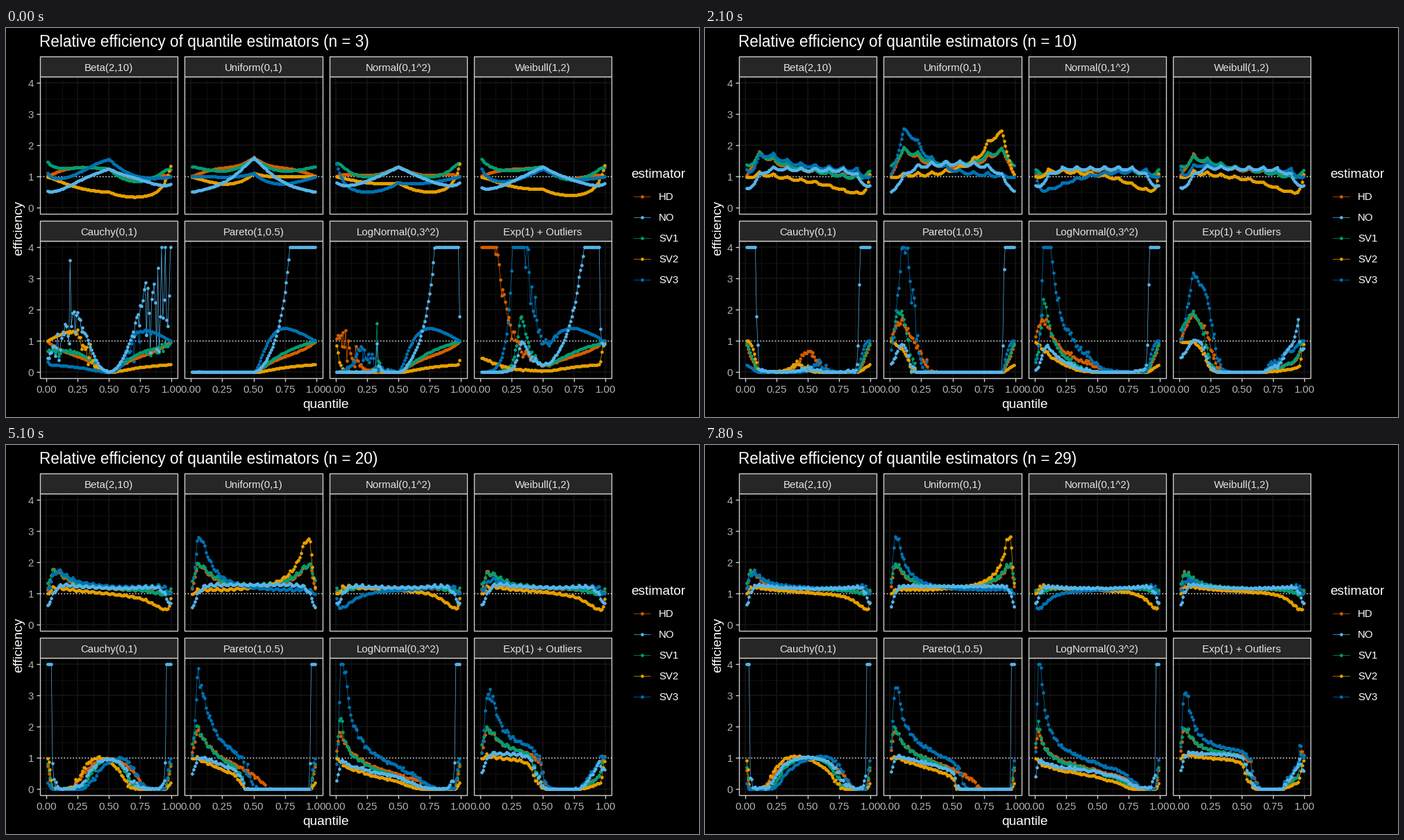
These frames come from a looping animation (998x561 px, 8000 ms). A matplotlib script:

```python
import math

import matplotlib.pyplot as plt
import numpy as np
from matplotlib.animation import FuncAnimation
from matplotlib.collections import LineCollection
from matplotlib.patches import Rectangle

W, H, DPI = 998, 561, 64
PX = 72 / DPI                      # one pixel in points
plt.rcParams["font.family"] = "Liberation Sans"

SIZES = range(3, 30)
P = np.arange(1, 100) / 100
GROUPS, GROUP_SIZE, PICKS = 70, 500, 15
CAP = 4

COLORS = {"HD": "#D55E00", "NO": "#56B4E9", "SV1": "#009E73",
          "SV2": "#E69F00", "SV3": "#0072B2"}
DRAW_ORDER = ["HD", "SV1", "SV2", "SV3", "NO"]

# --- quantile functions of the eight distributions ---
Z = np.linspace(-6, 6, 6001)
PHI = np.array([0.5 * math.erfc(-z / math.sqrt(2)) for z in Z])
BX = np.linspace(0, 1, 4001)
BETA_CDF = 1 - (1 - BX) ** 10 * (1 + 10 * BX)
BODY_SHARE, MAX_OUTLIER = 0.95, 4000


def normal(u):
    return np.interp(u, PHI, Z)


def exp_outliers(u):
    """Exponential body; the top share is uniform up to MAX_OUTLIER."""
    body = -np.log1p(-np.minimum(u / BODY_SHARE, 0.9999))
    outlier = MAX_OUTLIER * (u - BODY_SHARE) / (1 - BODY_SHARE)
    return np.maximum(body, outlier)


# name, quantile function, heavy tailed
DISTRIBUTIONS = [
    ("Beta(2,10)", lambda u: np.interp(u, BETA_CDF, BX), False),
    ("Uniform(0,1)", lambda u: u, False),
    ("Normal(0,1^2)", normal, False),
    ("Weibull(1,2)", lambda u: np.sqrt(-np.log1p(-u)), False),
    ("Cauchy(0,1)", lambda u: np.tan(np.pi * (u - 0.5)), True),
    ("Pareto(1,0.5)", lambda u: (1 - u) ** -2, True),
    ("LogNormal(0,3^2)", lambda u: np.exp(3 * normal(u)), True),
    ("Exp(1) + Outliers", exp_outliers, True),
]


# --- weights of the order statistics, each of shape (99, n) ---
def hd_weights(n):
    nodes, gauss = np.polynomial.legendre.leggauss(16)
    x = (np.arange(1, n)[:, None] + (nodes + 1) / 2) / n
    half = []
    for p in P[:50]:
        a, b = (n + 1) * p, (n + 1) * (1 - p)
        log_beta = math.lgamma(a) + math.lgamma(b) - math.lgamma(a + b)
        pdf = np.exp((a - 1) * np.log(x) + (b - 1) * np.log1p(-x) - log_beta)
        cells = pdf @ gauss / (2 * n)
        half.append([1 - cells.sum(), *cells])
    half = np.array(half)
    return np.vstack([half, half[-2::-1, ::-1]])


def estimator_weights(n):
    """Reference (linear interpolation) first, then DRAW_ORDER."""
    p = P[:, None]
    ref = np.clip(1 - abs((n - 1) * p - np.arange(n)), 0, 1)
    binom = np.array([math.comb(n, i) * P ** i * (1 - P) ** (n - i)
                      for i in range(n + 1)]).T
    low, high = binom[:, :-1], binom[:, 1:]
    b0, bn = binom[:, :1], binom[:, -1:]

    sv1 = (low + high) / 2
    sv1[:, :3] += b0 / 2 * [1, 1, -1]
    sv1[:, -3:] += bn / 2 * [-1, 1, 1]

    sv2 = low.copy()
    sv2[:, -2:] += bn * [-1, 2]

    sv3 = high.copy()
    sv3[:, :2] += b0 * [2, -1]

    no = (1 - p) * low + p * high
    no[:, :3] += b0 * np.hstack([3 * p - 1, 2 - 3 * p, p - 1])
    no[:, -3:] += bn * np.hstack([-p, 3 * p - 1, 2 - 3 * p])
    return np.array([ref, hd_weights(n), sv1, sv2, sv3, no])


def efficiencies(n):
    """Relative efficiency, shape (distribution, estimator, quantile)."""
    rng = np.random.default_rng(100 + n)
    u = np.sort(rng.random((GROUPS, GROUP_SIZE, n)), axis=-1)
    weights = estimator_weights(n).reshape(-1, n)
    result = []
    for _, quantile, heavy in DISTRIBUTIONS:
        x = quantile(u)
        q = np.tile(quantile(P), 6)
        second = x.transpose(0, 2, 1) @ x / GROUP_SIZE
        square = ((weights @ second) * weights).sum(-1)
        mse = square - 2 * q * (x.mean(1) @ weights.T) + q ** 2
        mse = mse.reshape(GROUPS, 6, len(P))
        if heavy:
            ratio = mse[:, :1] / mse[:, 1:]
            picks = rng.integers(0, GROUPS, (PICKS, len(P)))
            eff = np.median(ratio[picks, :, np.arange(len(P))], axis=0).T
        else:
            mean = mse.mean(0)
            eff = mean[0] / mean[1:]
        result.append(np.clip(eff, 0, CAP))
    return np.array(result)


CURVES = [efficiencies(n) for n in SIZES]

# --- stage, in pixels with y downwards ---
PANEL_W, PANEL_H, STRIP_H = 198.5, 198.2, 29
XS, YS = 180.4, 45.05
BORDER = "#CCCCCC"

fig = plt.figure(figsize=(W / DPI, H / DPI), dpi=DPI, facecolor="black")
ax = fig.add_axes([0, 0, 1, 1])
ax.set(xlim=(0, W), ylim=(H, 0))
ax.axis("off")


def text(x, y, s, size, color="white", ha="left", **kw):
    return ax.text(x, y, s, fontsize=size * PX, color=color, ha=ha,
                   va="baseline", **kw)


def segments(lines, color, width, z):
    ax.add_collection(LineCollection(lines, colors=color,
                                     linewidths=width * PX, zorder=z))


def box(x, y, w, h, fill, z):
    ax.add_patch(Rectangle((x, y), w, h, facecolor=fill, edgecolor=BORDER,
                           linewidth=1.4 * PX, zorder=z))


def stroke(color):
    return ax.plot([], [], color=color, lw=0.7 * PX, zorder=3)[0]


def dots(color):
    return ax.plot([], [], "o", color=color, ms=4.7 * PX, mew=0, zorder=4)[0]


def draw_panel(left, top, name, first_col, last_row):
    x0, y0 = left + 9.05, top + PANEL_H - 9
    right, bottom = left + PANEL_W, top + PANEL_H

    def vertical(vals):
        return [[(x0 + XS * v, top), (x0 + XS * v, bottom)] for v in vals]

    def horizontal(vals):
        return [[(left, y0 - YS * v), (right, y0 - YS * v)] for v in vals]

    quarters = np.arange(5) / 4
    segments(vertical(quarters[:4] + 0.125) + horizontal(np.arange(4) + 0.5),
             "#141414", 0.8, 0)
    segments(vertical(quarters) + horizontal(range(5)), "#141414", 1.6, 1)
    ax.plot([left, right], [y0 - YS] * 2, color="white", lw=1.4 * PX,
            ls=(0, (1, 2.05)), zorder=2)
    box(left, top, PANEL_W, PANEL_H, "none", 5)
    box(left, top - STRIP_H, PANEL_W, STRIP_H, "#262626", 5)
    text(left + PANEL_W / 2, top - 8, name, 15, "#E5E5E5", "center", zorder=6)

    if first_col:
        segments([[(left - 4.7, y0 - YS * v), (left, y0 - YS * v)]
                  for v in range(5)], BORDER, 1.4, 5)
        for v in range(5):
            text(left - 9, y0 - YS * v + 5.7, str(v), 15, "#B3B3B3", "right")
    if last_row:
        segments([[(x0 + XS * v, bottom), (x0 + XS * v, bottom + 4.7)]
                  for v in quarters], BORDER, 1.4, 5)
        for v in quarters:
            text(x0 + XS * v, bottom + 20.8, f"{v:.2f}", 15, "#B3B3B3",
                 "center")
    return x0, y0


series = []
for k, (name, _, _) in enumerate(DISTRIBUTIONS):
    row, col = divmod(k, 4)
    x0, y0 = draw_panel(49 + 208.3 * col, 70 + 237.2 * row, name,
                        col == 0, row == 1)
    for e, key in enumerate(DRAW_ORDER):
        artists = stroke(COLORS[key]), dots(COLORS[key])
        series.append((k, e, x0 + XS * P, y0, artists))

title = text(48.5, 27.3, "", 22.5)
text(460.5, 547.5, "quantile", 19.1, ha="center")
text(23.5, 288, "efficiency", 19.1, ha="center", rotation=90,
     rotation_mode="anchor")

text(900, 216, "estimator", 19.1)
for i, (key, color) in enumerate(COLORS.items()):
    y = 242.5 + 30 * i
    stroke(color).set_data([904, 928], [y, y])
    dots(color).set_data([916], [y])
    text(940, y + 5.5, key, 15)

STEP_MS, TICK_MS, LOOP_MS = 300, 100, 8000


def update(tick):
    step = tick * TICK_MS // STEP_MS
    title.set_text("Relative efficiency of quantile estimators "
                   f"(n = {SIZES[step]})")
    for k, e, x, y0, artists in series:
        y = y0 - YS * CURVES[step][k, e]
        for artist in artists:
            artist.set_data(x, y)
    return [title]


anim = FuncAnimation(fig, update, frames=LOOP_MS // TICK_MS,
                     interval=TICK_MS, repeat=True, repeat_delay=0)
plt.show()
```
